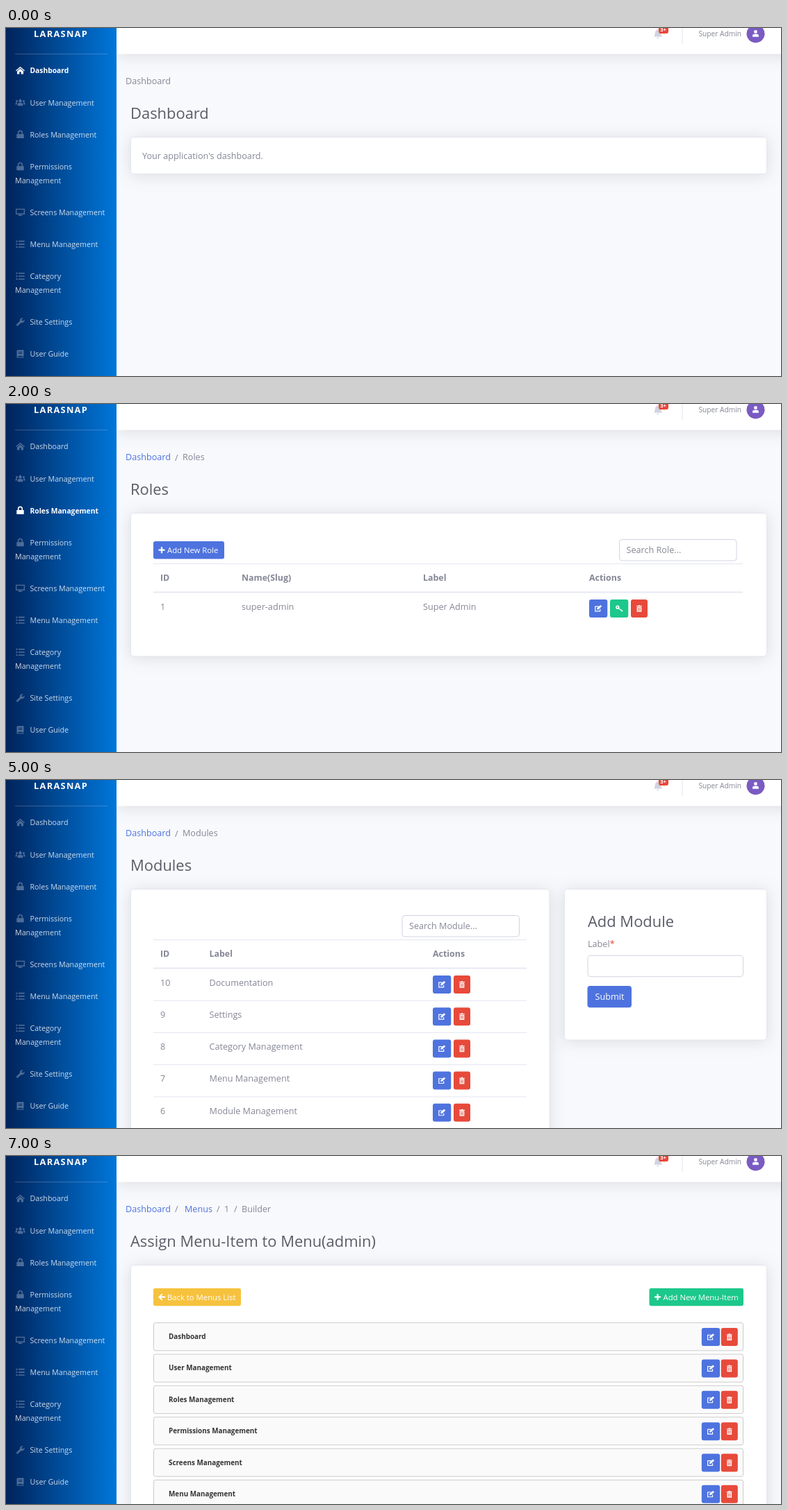
Recreate the animation shown at these times as an HTML page. Size 1115 px wide and 502 px high, loop 8 s.

```html
<!DOCTYPE html>
<html lang="en">
<head>
<meta charset="utf-8">
<title>Admin panel tour</title>
<style>
  html, body { margin: 0; width: 100%; height: 100%; overflow: hidden; background: #f8f9fc; }
  svg { display: block; width: 1115px; height: 502px; font-family: "Open Sans", "Noto Sans", sans-serif; }
  text { white-space: pre; }
  .shadow { filter: drop-shadow(0 2px 11.5px rgba(58, 59, 69, .15)); }
</style>
</head>
<body>
<svg id="stage" viewBox="0 0 1115 502"></svg>
<script>
const GRAY = '#858796', DARK = '#5a5c69', LINE = '#e3e6f0', BORDER = '#d1d3e2',
  BLUE = '#4e73df', CYAN = '#36b9cc', GREEN = '#1cc88a', RED = '#e74a3b', YELLOW = '#f6c23e';
const SLIDE_MS = 1000, SCROLL = 20.5;

const dot = (x, y, r) => `M${x - r} ${y}a${r} ${r} 0 1 0 ${2 * r} 0a${r} ${r} 0 1 0 ${-2 * r} 0z`;
const ICONS = {
  home: 'M-6.5 0L0-5.5 6.5 0 5.6 1 0-3.8-5.6 1zM-4.5 1.2L0-2.7 4.5 1.2V5.2H1.2V2H-1.2V5.2H-4.5z',
  users: dot(0, -2.3, 2.3) + dot(-5, -2, 1.5) + dot(5, -2, 1.5) +
    'M-3.8 4.8V3Q-3.8.6-1.3.6H1.3Q3.8.6 3.8 3V4.8zM-7 3V1.5Q-7 0-5.5 0H-4Q-4.8 1-4.8 3zM7 3V1.5Q7 0 5.5 0H4Q4.8 1 4.8 3z',
  lock: 'M-5.2-.5H-3.6V-2.4A3.6 3.6 0 0 1 3.6-2.4V-.5H5.2V5.5H-5.2zM-2-.5H2V-2.4A2 2 0 0 0-2-2.4z',
  screen: 'M-6.5-5H6.5V3.2H-6.5zM-5.2-3.7V1.9H5.2V-3.7zM-3 4.2H3V5.4H-3zM-1 3.2H1V4.2H-1z',
  list: [-4.2, 0, 4.2].map(y => `M-6 ${y - 1}h2v2h-2zM-2.6 ${y - .8}h8.8v1.6h-8.8z`).join(''),
  wrench: 'M-6 4.2L-.6-1.2A3.8 3.8 0 0 1 4.2-5.6L2-3.3 2.4-1.6 4-1.2 6-3.4A3.8 3.8 0 0 1 1.2 1.2L-4.2 6z',
  book: 'M-5-4.3Q-5-5.7-3.5-5.7H5V3H4.2V4.7H5V5.7H-3.5Q-5 5.7-5 4.3zM-3.2 3V4.6H3.2V3zM-2.6-3.2V-2.2H2.8V-3.2zM-2.6-1.2V-.2H2.8V-1.2z',
  bell: 'M0-6.5Q4.2-5.5 4.2-1Q4.2 2 6 4H-6Q-4.2 2-4.2-1Q-4.2-5.5 0-6.5zM-1.6 4.9H1.6A1.6 1.6 0 0 1-1.6 4.9z',
  user: dot(0, -2.6, 2.6) + 'M-4.7 5V3.4Q-4.7.8-2 .8H2Q4.7.8 4.7 3.4V5z',
  eye: 'M-6 0Q0-8 6 0Q0 8-6 0z' + dot(0, 0, 2.6) + dot(0, 0, 1.4),
  edit: 'M-5.5-3.8H1V-2.5H-4.2V3.7H2.2V1.5L3.5.3V5H-5.5zM-2 1.6V-.5L3.5-5.5 5.7-3.5 .2 1.6z',
  key: dot(-2.5, -2, 3) + dot(-2.7, -2.2, 1.2) + 'M.1-.4L5.5 3V4.9H3.7V3.7H2.2V2.4L-1 .7z',
  trash: 'M-4.4-4.4H-1.5V-5.4H1.5V-4.4H4.4V-3.2H-4.4zM-3.7-2.5H3.7V5.4H-3.7zM-2.2-1.2V4H-1.4V-1.2zM-.4-1.2V4H.4V-1.2zM1.4-1.2V4H2.2V-1.2z',
  plus: 'M-1.1-4.5H1.1V-1.1H4.5V1.1H1.1V4.5H-1.1V1.1H-4.5V-1.1H-1.1z',
  arrow: 'M-5 0L0-5 1.3-3.6-1.2-1.1H5V1.1H-1.2L1.3 3.6 0 5z'
};

// Text is placed by its left edge and the middle of its capitals.
const text = (x, y, s, size = 12.65, fill = GRAY, weight = 400, extra = '') =>
  `<text x="${x}" y="${y + size * .357}" font-size="${size}" fill="${fill}" font-weight="${weight}" ${extra}>${s}</text>`;
const bold = (x, y, s, size = 12.4, fill = GRAY) => text(x, y, s, size, fill, 700);
const rect = (x, y, x2, y2, fill, r = 0, extra = '') =>
  `<rect x="${x}" y="${y}" width="${x2 - x}" height="${y2 - y}" rx="${r}" fill="${fill}" ${extra}/>`;
const icon = (name, x, y, fill = '#fff', k = 1) =>
  `<path d="${ICONS[name]}" transform="translate(${x} ${y}) scale(${k})" fill="${fill}" fill-rule="evenodd"/>`;
const rule = (x, x2, y, h = 1) => rect(x, y - h / 2, x2, y + h / 2, LINE);
const card = (x, x2, y2) => rect(x, 157.5, x2, y2, '#fff', 4, `stroke="${LINE}" class="shadow"`);
const field = (x, x2, y, label = '') =>
  rect(x + .5, y + .5, x2 - .5, y + 31, '#fff', 4, `stroke="${BORDER}"`) + text(x + 10.5, y + 15.7, label);
const select = (x, x2, label) => field(x, x2, 195) + text(x + 14, 210.7, label, 12.8) +
  `<path d="M${x2 - 12} 209.2l3.2 3.2 3.2-3.2" fill="none" stroke="#444" stroke-width="1.6"/>`;
const button = (x, x2, label, glyph, y = 198, color = BLUE) => rect(x, y, x2, y + 25.5, color, 3) +
  (glyph ? icon(glyph, x + 12, y + 12.7) : '') + text(x + (glyph ? 20 : 7.5), y + 12.9, label, 11.3, '#fff');

const ACTIONS = { eye: [CYAN, 26.3], edit: [BLUE, 26.3], key: [GREEN, 26.3], trash: [RED, 24] };
const actions = (x, y, names, gap = 3.7) => names.split(' ').map(name => {
  const [color, w] = ACTIONS[name], left = x;
  x += w + gap;
  return rect(left, y - 13, left + w, y + 13, color, 3) + icon(name, left + w / 2, y, '#fff', .9);
}).join('');

const rowY = i => 292.3 + i * 46.2;
// The last column holds the action buttons.
function table(cols, heads, rows, names, right = 1060) {
  const last = cols[cols.length - 1];
  return rule(212, right, 230.5) + rule(212, right, 271.5, 1.7) +
    heads.split('|').map((h, i) => bold(cols[i], 251, h)).join('') +
    rows.map((row, r) => row.split('|').map((c, i) => text(cols[i], rowY(r), c)).join('') +
      actions(last, rowY(r) + 2.7, names) +
      (r < rows.length - 1 ? rule(212, right, rowY(r) + 26) : '')).join('');
}

const MENU = [
  ['home', 'Dashboard'], ['users', 'User Management'], ['lock', 'Roles Management'],
  ['lock', 'Permissions', 'Management'], ['screen', 'Screens Management'], ['list', 'Menu Management'],
  ['list', 'Category', 'Management'], ['wrench', 'Site Settings'], ['book', 'User Guide']
];

function sidebar(active) {
  let y = 61.6;
  let out = rect(0, -30, 159, 530, 'url(#side)') +
    text(40, 8, 'LARASNAP', 12.8, '#fff', 700, 'letter-spacing="1.3"') +
    rect(13, 37, 146, 38, 'rgba(255,255,255,.2)');
  MENU.forEach(([glyph, label, second], i) => {
    const on = i === active;
    const fill = on ? '#fff' : 'rgba(255,255,255,.8)';
    const line = (x, s) => text(x, y, s, on ? 10.3 : 10.7, fill, on ? 700 : 400);
    if (on && glyph === 'screen') [label, second] = label.split(' ');
    out += icon(glyph, 20.5, y - .3, on ? '#fff' : 'rgba(255,255,255,.3)') + line(34.5, label);
    if (second) {
      y += 19.8;
      out += line(13, second);
    }
    y += 46.15;
  });
  return out;
}

const topbar = rect(159, -40, 1160, 37.5, '#fff', 0, 'class="shadow"') +
  icon('bell', 938, 8.5, BORDER) + rect(939, -2.6, 953, 8, RED, 3) + bold(941.3, 2.8, '3+', 7.5, '#fff') +
  rect(972.5, -7.5, 973.5, 23.5, LINE) + text(996.5, 8.2, 'Super Admin', 10.2) +
  `<circle cx="1078.5" cy="8.3" r="13" fill="#7a5bc3"/>` + icon('user', 1078.5, 8, '#fff', .95);

const page = (active, title, body, crumbs, scroll = SCROLL) =>
  `<g visibility="hidden" transform="translate(0 ${SCROLL - scroll})">` + topbar +
  (crumbs || text(172, 77, 'Dashboard', 12.6, BLUE) + text(243, 77, '/') + text(254, 77, title, 12.6)) +
  text(179, 123, title, 21.9, DARK) + body + sidebar(active) + '</g>';

const wide = y2 => card(179.5, 1094.5, y2);
const search = name => field(882, 1051.5, 195, `Search ${name}...`);

const pages = [
  page(0, 'Dashboard', wide(210.5) + text(196, 184, "Your application's dashboard."),
    text(172, 77, 'Dashboard', 12.6)),

  page(1, 'Users', wide(364) + button(212, 316, 'Add New User', 'plus') +
    select(402.5, 510.5, 'Latest First') + select(515, 632, 'All Roles') +
    select(636, 761, 'All Users') + select(765, 878.5, 'Bulk Actions') + search('User') +
    table([267, 317, 460, 656, 785, 873], 'ID|Name|Email|Role|Status|Actions',
      ['1|Super Admin|||Active'], 'eye edit key trash') +
    text(460, rowY(0), 'owner@panels.test', 12.65, BLUE) +
    rect(655.5, 285.7, 723, 300.5, GREEN, 3.5) + bold(659.3, 293.2, 'Super Admin', 9.35, '#fff') +
    [250, 291.2].map(y => rect(222.5, y - 5, 232.8, y + 5.3, '#fff', 2, 'stroke="#767676"')).join('')),

  page(2, 'Roles', wide(364) + button(212, 314, 'Add New Role', 'plus') + search('Role') +
    table([222, 339, 600, 839], 'ID|Name(Slug)|Label|Actions',
      ['1|super-admin|Super Admin'], 'edit key trash')),

  page(3, 'Permissions', wide(358.5) + button(212, 349, 'Add New Permission', 'plus') + search('Permission') +
    table([222, 339, 657, 839], 'ID|Name(Slug)|Label|Actions', [], '') +
    text(636.5, 292.3, 'No Permission found!', 12.65, GRAY, 400, 'text-anchor="middle"'), '', 0),

  page(4, 'Screens', wide(560) + button(212, 327, 'Add New Screen', 'plus') +
    button(354, 457, 'Manage Modules') + search('Screen') +
    table([222, 283.5, 482.5, 706, 924], 'ID|Name(Slug)|Label|Module|Actions', [
      '60|docs.icons|Icons|Documentation',
      '59|docs.index|Document|Documentation',
      '58|settings.create|Settings|Settings',
      '57|categories.destroy|Category Delete|Category Management',
      '56|categories.edit|Category Edit|Category Management'
    ], 'edit key trash')),

  page(-1, 'Modules', card(179.5, 782, 560) + field(569.5, 739, 195, 'Search Module...') +
    table([222, 292.5, 614], 'ID|Label|Actions', [
      '10|Documentation', '9|Settings', '8|Category Management', '7|Menu Management', '6|Module Management'
    ], 'edit trash', 749) +
    card(803.5, 1094.5, 375) + text(837, 204, 'Add Module', 21.9, DARK) +
    text(837, 236.3, `Label<tspan fill="${RED}">*</tspan>`) + field(836.5, 1061, 252.7) +
    rect(836.5, 297, 900, 328.3, BLUE, 4) + text(847.5, 312.8, 'Submit', 12.65, '#fff')),

  page(5, 'Menus', wide(364) + button(212, 319, 'Add New Menu', 'plus') + search('Menu') +
    table([222, 339, 839], 'ID|Name|Actions', ['1|admin'], 'edit key trash')),

  page(-1, 'Assign Menu-Item to Menu(admin)', wide(560) +
    button(212, 338, 'Back to Menus List', 'arrow', 190.7, YELLOW) +
    button(925.5, 1061, 'Add New Menu-Item', 'plus', 190.7, GREEN) +
    ['Dashboard', 'User Management', 'Roles Management', 'Permissions Management',
      'Screens Management', 'Menu Management'].map((name, i) => {
      const y = 260.6 + i * 45.35;
      return rect(212.5, y - 20, 1060.5, y + 20.2, '#fafafa', 2.5, 'stroke="#ccc"') +
        bold(234, y, name, 9.9, '#333') + actions(1000.8, y + .5, 'edit trash', 1.7);
    }).join(''),
    [[172, 'Dashboard', BLUE], [243, '/'], [257, 'Menus', BLUE], [303, '/'], [314, '1'], [328, '/'], [339, 'Builder']]
      .map(([x, s, color]) => text(x, 77, s, 12.6, color)).join(''))
];

const stage = document.getElementById('stage');
stage.innerHTML = `<defs><linearGradient id="side">
  <stop stop-color="#00235b"/><stop offset="1" stop-color="#0077da"/></linearGradient></defs>` + pages.join('');
const slides = stage.querySelectorAll(':scope > g');

function frame() {
  const current = Math.floor(performance.now() / SLIDE_MS) % slides.length;
  slides.forEach((g, i) => g.setAttribute('visibility', i === current ? 'visible' : 'hidden'));
  requestAnimationFrame(frame);
}
frame();
</script>
</body>
</html>
```
